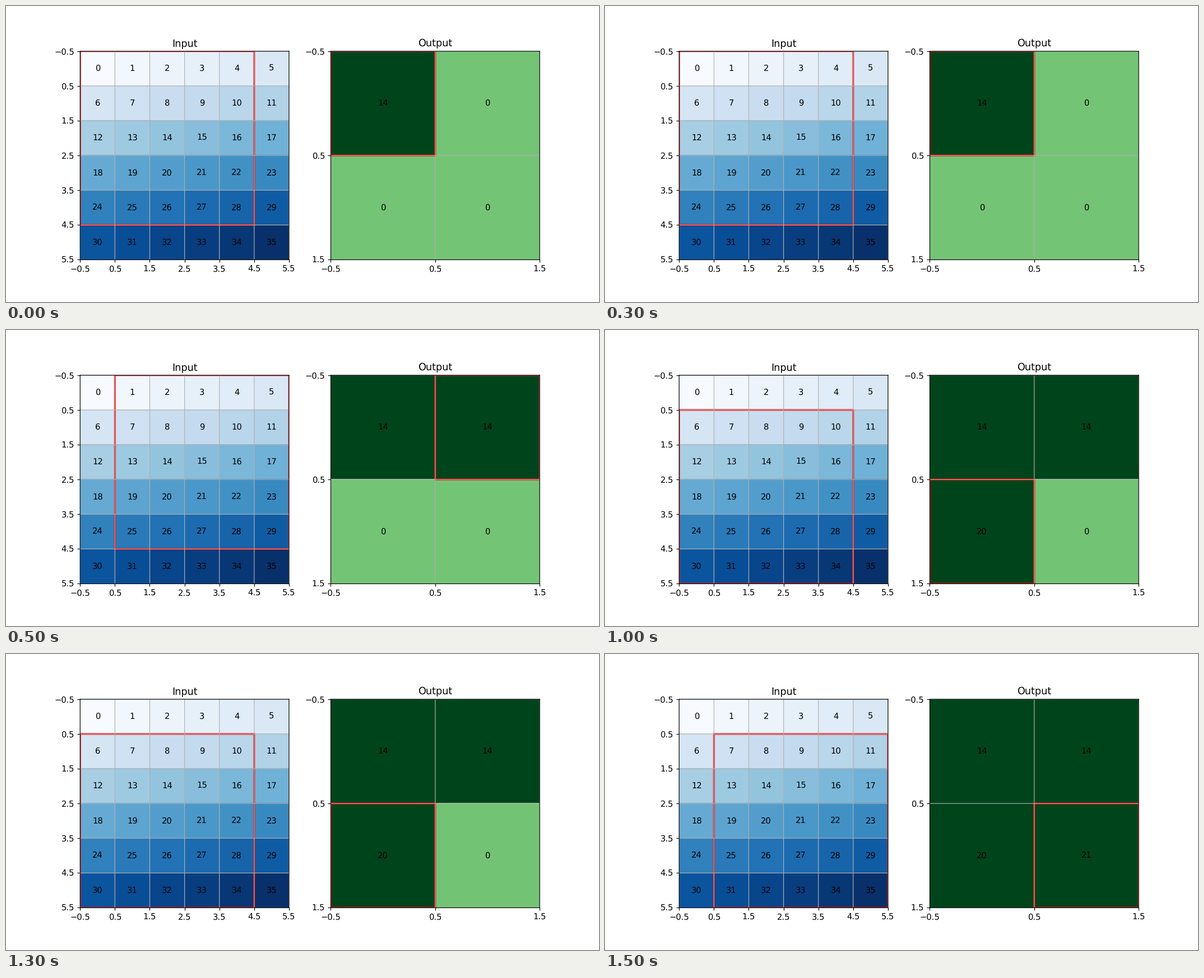
Write a matplotlib script that moves like this. It is 1058x529 px and loops after 2 s.

```python
import numpy as np
import matplotlib.pyplot as plt
from matplotlib.animation import FuncAnimation
from matplotlib.patches import Rectangle

WIDTH, HEIGHT = 1058, 529
FIG_WIDTH = 10
IN_SIZE, WINDOW = 6, 5
OUT_SIZE = IN_SIZE - WINDOW + 1
RESULTS = np.array([14, 14, 20, 21])

# Smooth subpixel edges and glyphs instead of pixel-aligned ones.
plt.rcParams.update({
    "font.family": "DejaVu Sans",
    "path.snap": False,
    "text.hinting": "none",
})


def draw_matrix(ax, values, title, **style):
    """Show a square matrix with cell borders and centred numbers."""
    size = len(values)
    image = ax.imshow(values, **style)
    edges = np.arange(size + 1) - 0.5
    ax.set_xticks(edges)
    ax.set_yticks(edges)
    ax.grid(True)
    ax.set_title(title)
    labels = [ax.text(col, row, str(values[row, col]), ha="center", va="center")
              for row in range(size) for col in range(size)]
    return image, labels


def add_cursor(ax, size):
    return ax.add_patch(Rectangle((-0.5, -0.5), size, size, fill=False,
                                  edgecolor="red", linewidth=2))


def output_after(step):
    """Results of the windows visited so far, zero elsewhere."""
    visited = np.arange(RESULTS.size) <= step
    return np.where(visited, RESULTS, 0).reshape(OUT_SIZE, OUT_SIZE)


fig, (ax_in, ax_out) = plt.subplots(
    1, 2, figsize=(FIG_WIDTH, FIG_WIDTH * HEIGHT / WIDTH), dpi=WIDTH / FIG_WIDTH)
grid = np.arange(IN_SIZE ** 2).reshape(IN_SIZE, IN_SIZE)
draw_matrix(ax_in, grid, "Input", cmap="Blues")
out_image, out_labels = draw_matrix(
    ax_out, output_after(-1), "Output", cmap="Greens", vmin=-1, vmax=1)
in_cursor = add_cursor(ax_in, WINDOW)
out_cursor = add_cursor(ax_out, 1)


def update(step):
    row, col = divmod(step, OUT_SIZE)
    for cursor in (in_cursor, out_cursor):
        cursor.set_xy((col - 0.5, row - 0.5))
    values = output_after(step)
    out_image.set_data(values)
    for label, value in zip(out_labels, values.flat):
        label.set_text(str(value))
    return [in_cursor, out_cursor, out_image, *out_labels]


anim = FuncAnimation(fig, update, frames=RESULTS.size, interval=500,
                     repeat=True, repeat_delay=0)
plt.show()
```
